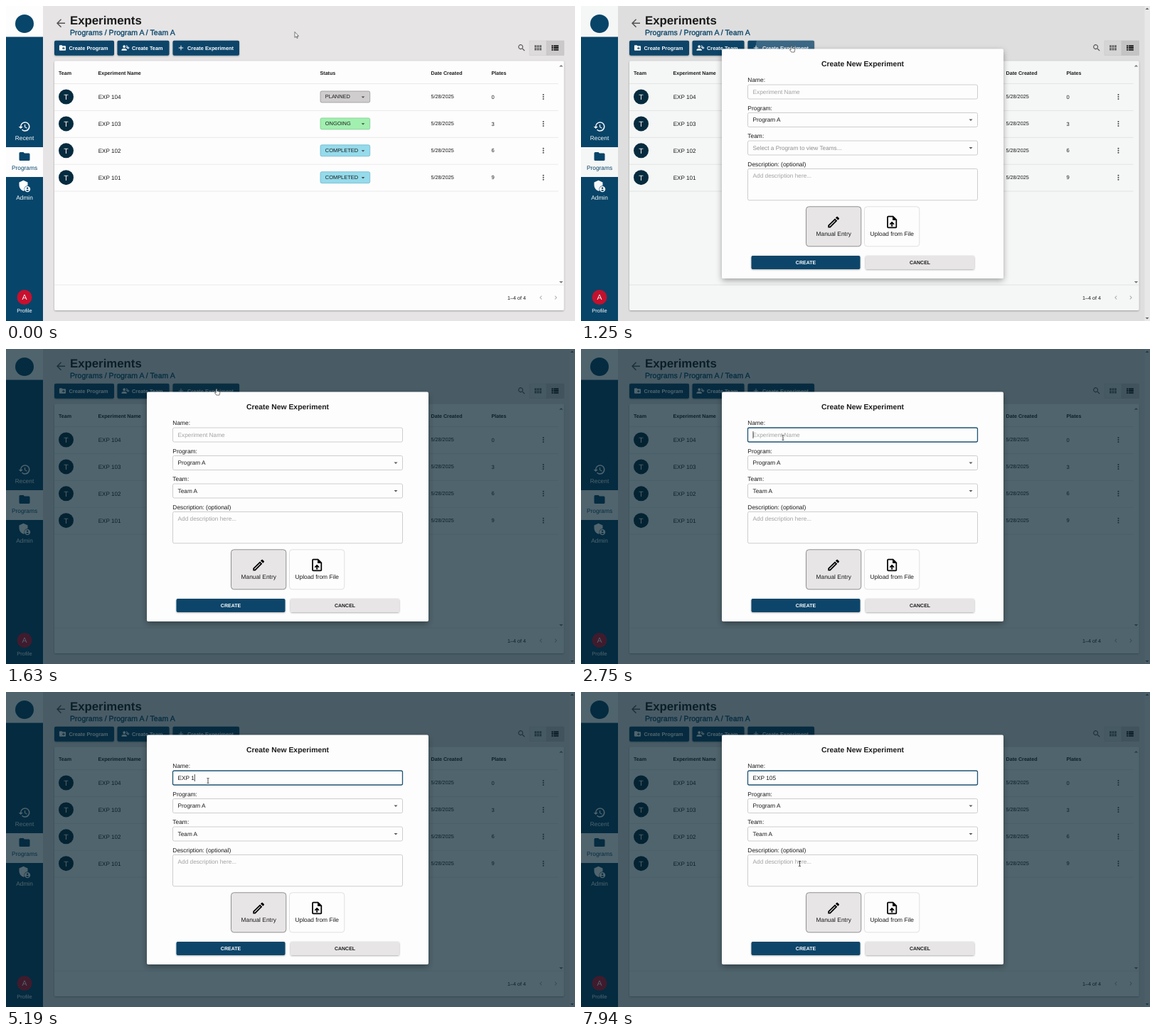
Write an HTML page that moves like this. It is 800 by 444 pixels and loops after 8 s.

```html
<!DOCTYPE html>
<html lang="en">
<head>
<meta charset="utf-8">
<title>Experiments</title>
<style>
html, body { margin: 0; width: 100%; height: 100%; overflow: hidden; background: #e6e4e5; }
svg { display: block; width: 100vw; height: 100vh; }
text { font-family: "Liberation Sans", Arial, sans-serif; text-rendering: geometricPrecision; white-space: pre; }
</style>
</head>
<body>
<svg id="stage" viewBox="0 0 800 444"></svg>
<script>
const NAVY = '#07456a', INK = '#1b1b1b', DEEP = '#052b3f';
const LOOP = 8000;

const icons = {
  back: 'M20 11H7.8l5.6-5.6L12 4l-8 8 8 8 1.4-1.4L7.8 13H20z',
  folder: 'M10 4H4a2 2 0 0 0-2 2v12a2 2 0 0 0 2 2h16a2 2 0 0 0 2-2V8a2 2 0 0 0-2-2h-8z',
  newFolder: 'M10 4H4a2 2 0 0 0-2 2v12a2 2 0 0 0 2 2h16a2 2 0 0 0 2-2V8a2 2 0 0 0-2-2h-8zM14 9h2v3h3v2h-3v3h-2v-3h-3v-2h3z',
  addGroup: 'M8 4a4 4 0 1 0 0 8a4 4 0 0 0 0-8zM0 20v-2c0-5 16-5 16 0v2zM14 4a4 4 0 0 1 0 8q3-4 0-8zM19 8h2v3h3v2h-3v3h-2v-3h-3v-2h3z',
  add: 'M19 13h-6v6h-2v-6H5v-2h6V5h2v6h6z',
  history: 'M13 3a9 9 0 0 0-9 9H1l4 4 4-4H6a7 7 0 1 1 2.1 4.9l-1.4 1.5A9 9 0 1 0 13 3zM12 8v5l4.3 2.5.7-1.2-3.5-2V8z',
  shield: 'M10 1L2 4.5V10c0 5 3.4 9.700 8 11q1-.3 2-.8A6.500 6.500 0 0 1 18 11V4.500zM17.500 12a5.500 5.500 0 1 0 0 11a5.500 5.500 0 0 0 0-11zM17.500 14a1.700 1.700 0 1 1 0 3.400a1.700 1.700 0 0 1 0-3.400zM14.500 20q3-3 6 0q-3 2.500-6 0z',
  search: 'M15.5 14h-.8l-.3-.3A6.500 6.500 0 1 0 13.700 14.400l.3.3v.8l5 5 1.500-1.500zM9.500 14a4.500 4.500 0 1 1 0-9a4.500 4.500 0 0 1 0 9z',
  grid: 'M3 5h5v6H3zM9.500 5h5v6h-5zM16 5h5v6h-5zM3 12.500h5v6H3zM9.500 12.500h5v6h-5zM16 12.500h5v6h-5z',
  list: 'M3 5h4v4H3zM8.500 5H21v4H8.500zM3 10h4v4H3zM8.500 10H21v4H8.500zM3 15h4v4H3zM8.500 15H21v4H8.500z',
  more: 'M12 4a2 2 0 1 0 0 4a2 2 0 0 0 0-4zM12 10a2 2 0 1 0 0 4a2 2 0 0 0 0-4zM12 16a2 2 0 1 0 0 4a2 2 0 0 0 0-4z',
  prev: 'M15.400 7.400L14 6l-6 6 6 6 1.400-1.400L10.800 12z',
  next: 'M8.600 7.400L10 6l6 6-6 6-1.400-1.400L13.200 12z',
  down: 'M7 10l5 5 5-5z',
  up: 'M7 14l5-5 5 5z',
  edit: 'M14.100 9l.9.9L5.900 19H5v-.9zM17.700 3a1 1 0 0 0-.7.3l-1.900 1.800 3.800 3.800 1.800-1.900a1 1 0 0 0 0-1.400l-2.300-2.300a1 1 0 0 0-.7-.3zM14.100 6.200L3 17.250V21h3.750L17.800 9.900z',
  upload: 'M14 2H6a2 2 0 0 0-2 2v16a2 2 0 0 0 2 2h12a2 2 0 0 0 2-2V8zM18 20H6V4h7v5h5zM8 15l1.400 1.400 1.600-1.600V19h2v-4.200l1.600 1.600L16 15l-4-4z'
};

const icon = (name, cx, cy, size, fill = INK) =>
  `<path d="${icons[name]}" fill="${fill}" fill-rule="evenodd" transform="translate(${cx - size / 2} ${cy - size / 2}) scale(${size / 24})"/>`;
const text = (s, x, y, size, fill = INK, extra = '') =>
  `<text x="${x}" y="${y}" font-size="${size}" fill="${fill}" ${extra}>${s}</text>`;
const rect = (x, y, w, h, fill, extra = '') =>
  `<rect x="${x}" y="${y}" width="${w}" height="${h}" fill="${fill}" ${extra}/>`;
const circle = (cx, cy, r, fill) => `<circle cx="${cx}" cy="${cy}" r="${r}" fill="${fill}"/>`;
const BOLD = 'font-weight="700"', MID = 'text-anchor="middle"';
const SOFT = 'rx="2" filter="url(#soft)"';

function sidebar() {
  const item = (name, label, y, color) => icon(name, 26, y, 18, color) + text(label, 26, y + 19.300, 8.350, color, MID);
  return rect(0, 0, 52, 444, NAVY) + rect(0, 0, 52, 43.500, '#fdfdfd') + circle(26, 25, 13, NAVY)
    + item('history', 'Recent', 170, '#fff')
    + rect(0, 199, 52, 42, '#fdfdfd') + item('folder', 'Programs', 212, NAVY)
    + item('shield', 'Admin', 254, '#fff')
    + circle(26, 410.500, 10.500, '#c8102e') + text('A', 26, 414.200, 10.500, '#fff', MID)
    + text('Profile', 26, 432.300, 7.500, '#fff', MID);
}

function header() {
  const button = (x, w, name, label) => rect(x, 48.800, w, 21, NAVY, SOFT)
    + icon(name, x + 11.500, 59, 11, '#fff') + text(label, x + 20.500, 61.600, 7.350, '#fff', BOLD);
  return icon('back', 77, 24.300, 18, '#555') + text('Experiments', 90, 26.300, 16.800, INK, BOLD)
    + text('Programs / Program A / Team A', 90, 40.600, 10.570, NAVY, `stroke="${NAVY}" stroke-width=".3"`)
    + button(68, 84, 'newFolder', 'Create Program')
    + button(156.500, 73, 'addGroup', 'Create Team')
    + button(234.500, 93.500, 'add', 'Create Experiment')
    + '<g clip-path="url(#createClip)"><circle id="ripple" cx="296" cy="59" fill="#fff"/></g>'
    + icon('search', 725, 59, 13, '#555')
    + rect(736, 49, 24.500, 20.500, '#dddbdc', 'stroke="#cfcdce" stroke-width=".6"') + icon('grid', 748, 59, 13, '#666')
    + rect(760, 49, 24.500, 20.500, '#cbc9ca', 'stroke="#c3c1c2" stroke-width=".6"') + icon('list', 772, 59, 13);
}

function table() {
  const line = y => rect(68, y, 708.500, .7, '#e2e2e2');
  const status = {
    PLANNED: ['#cfcdce', '#8d8b8c'], ONGOING: ['#a1f0b0', '#78c889'], COMPLETED: ['#95dbeb', '#62b0c6']
  };
  const row = ([name, state, plates], i) => {
    const y = 128 + 37.900 * i, [fill, edge] = status[state];
    return circle(84.500, y, 10.500, DEEP) + text('T', 84.500, y + 3.800, 10.500, '#fff', MID)
      + text(name, 129.700, y + 3, 8.100)
      + rect(442, y - 8, 69.700, 16, fill, `rx="2" stroke="${edge}" stroke-width=".7"`)
      + text(state, 448.800, y + 2.400, 7.450) + icon('down', 502, y + .3, 11, '#444')
      + text('5/28/2025', 597.400, y + 2.400, 7.300) + text(plates, 682.500, y + 2.600, 7.600)
      + icon('more', 755.500, y, 12, '#444') + line(y + 19);
  };
  const heads = [['Team', 74], ['Experiment Name', 129.500], ['Status', 441.500], ['Date Created', 597.500], ['Plates', 682.500]];
  const rows = [['EXP 104', 'PLANNED', 0], ['EXP 103', 'ONGOING', 3], ['EXP 102', 'COMPLETED', 6], ['EXP 101', 'COMPLETED', 9]];
  return rect(68, 77.500, 716.500, 351.500, '#fdfdfd', SOFT)
    + heads.map(([label, x]) => text(label, x, 97.300, 7.150, INK, BOLD)).join('')
    + line(109) + rows.map(row).join('')
    + rect(68, 392.700, 716.500, .7, '#e2e2e2')
    + icon('up', 780.500, 84.500, 13, '#777') + icon('down', 780.500, 389, 13, '#777')
    + text('1–4 of 4', 705, 413.700, 7.200) + icon('prev', 752, 411, 11, '#aaa') + icon('next', 773, 411, 11, '#aaa');
}

function dialog() {
  const field = (label, y, h, id = '') => text(label, 234.300, y - 3.600, 8.430)
    + rect(234.500, y, 323, h, '#fdfdfd', `${id} rx="2" stroke="#c2c2c2" stroke-width=".8"`);
  const arrow = y => icon('down', 548, y, 12, '#555');
  const choice = (x, name, label, fill, edge) =>
    rect(x, 282.800, 77.300, 56, fill, `rx="4" stroke="${edge}" stroke-width="1"`)
    + icon(name, x + 38.700, 304.500, 21, '#000') + text(label, x + 38.700, 324, 8.380, INK, MID);
  const action = (x, label, fill, color) => rect(x, 352, 153, 19, fill, SOFT)
    + text(label, x + 76.500, 364.200, 7, color, `${BOLD} ${MID}`);
  return rect(198, 60.500, 396, 323.500, '#fdfdfd', 'rx="2" filter="url(#lift)"')
    + text('Create New Experiment', 396, 85.300, 10.400, INK, `${BOLD} ${MID}`)
    + field('Name:', 111, 20, 'id="nameBox"') + text('', 241.600, 123.800, 8.250, INK, 'id="name"')
    + rect(0, 116, .8, 10, '#222', 'id="caret"')
    + field('Program:', 150.500, 20) + text('Program A', 241.600, 163.400, 8.250) + arrow(160.500)
    + field('Team:', 190, 20) + text('', 241.600, 202.900, 8.250, INK, 'id="team"') + arrow(200)
    + field('Description: (optional)', 229.500, 44.300) + text('Add description here...', 241.600, 242.400, 8.250, '#a2a2a2')
    + choice(316.500, 'edit', 'Manual Entry', '#e7e5e6', '#8f8f8f')
    + choice(398.500, 'upload', 'Upload from File', '#fdfdfd', '#e0e0e0')
    + action(239.500, 'CREATE', NAVY, '#fff') + action(400, 'CANCEL', '#e7e5e6', INK);
}

const cursors = `
  <path id="pointer" d="M0 0V8L1.900 6.300 3.100 9 4.300 8.500 3.100 5.900H5.500z" fill="#fff" stroke="#222" stroke-width=".6"/>
  <path id="hand" d="M-.8 .5Q0-.6 .8 .5V3.400L4 4.100Q5 4.400 4.800 5.500L4 9H-.2L-2.600 5.700Q-2.300 4.600-.8 5.700z" fill="#fff" stroke="#222" stroke-width=".6"/>
  <path id="beam" d="M-1.500-3.500H-.4L0-3.100 .4-3.500H1.500M0-3.100V3.100M-1.500 3.500H-.4L0 3.100 .4 3.500H1.500" fill="none" stroke="#222" stroke-width=".8"/>`;

const stage = document.getElementById('stage');
stage.innerHTML = `<defs>
  <filter id="soft" x="-10%" y="-20%" width="120%" height="150%"><feDropShadow dx="0" dy=".8" stdDeviation=".8" flood-opacity=".35"/></filter>
  <filter id="lift" x="-10%" y="-10%" width="120%" height="125%"><feDropShadow dx="0" dy="3" stdDeviation="4" flood-opacity=".35"/></filter>
  <clipPath id="createClip"><rect x="234.500" y="48.800" width="93.500" height="21" rx="2"/></clipPath></defs>`
  + rect(0, 0, 800, 444, '#e6e4e5') + sidebar() + header() + table()
  + `<g id="modal">${rect(792.500, 0, 7.500, 444, '#f0eeef')}${icon('up', 796, 4, 12, '#666')}${icon('down', 796, 440, 12, '#666')}
     ${rect(0, 0, 800, 444, '#04202d', 'id="shade"')}${dialog()}</g>` + cursors;

const el = id => document.getElementById(id);
const show = (id, on) => el(id).setAttribute('display', on ? 'inline' : 'none');
const set = (id, attrs) => { for (const k in attrs) el(id).setAttribute(k, attrs[k]); };
const progress = (t, from, to) => Math.min(1, Math.max(0, (t - from) / (to - from)));
const ease = p => p * p * (3 - 2 * p);

const OPEN = 1190, TEAM_READY = 1480, FOCUS = 2600;
const typed = 'EXP 105', keyTimes = [4300, 4480, 4660, 4840, 5000, 5600, 5950];
const path = [[0, 406, 36.500], [150, 406, 36.500], [850, 296, 56], [1700, 296, 56], [2350, 284, 125],
  [6150, 284, 125], [6600, 286, 124.500], [6950, 286, 124.500], [7850, 307.500, 242]];

function cursorAt(t) {
  const i = path.findIndex(([time]) => time > t);
  if (i < 0) return path[path.length - 1].slice(1);
  const [t0, x0, y0] = path[i - 1], [t1, x1, y1] = path[i], p = ease(progress(t, t0, t1));
  return [x0 + (x1 - x0) * p, y0 + (y1 - y0) * p];
}

function render(t) {
  show('modal', t >= OPEN);
  set('shade', { opacity: .69 * ease(progress(t, 1210, 1520)) });
  set('ripple', { r: 75 * progress(t, 1090, 1330), opacity: .2 * (1 - progress(t, 1450, 1650)) });

  const count = keyTimes.filter(k => k <= t).length;
  set('name', { fill: count ? INK : '#a2a2a2' });
  el('name').textContent = count ? typed.slice(0, count) : 'Experiment Name';
  const teamReady = t >= TEAM_READY;
  set('team', { fill: teamReady ? INK : '#8e8e8e' });
  el('team').textContent = teamReady ? 'Team A' : 'Select a Program to view Teams...';

  const focused = t >= FOCUS;
  set('nameBox', focused ? { stroke: '#1f5575', 'stroke-width': 1.300 } : { stroke: '#c2c2c2', 'stroke-width': .8 });
  const lastKey = count ? keyTimes[count - 1] : FOCUS;
  show('caret', focused && (t - lastKey) % 1060 < 530);
  set('caret', { x: 241.600 + (count ? el('name').getComputedTextLength() : 0) });

  const [x, y] = cursorAt(t);
  const overText = t > OPEN && ((y > 111 && y < 131) || y > 229.500);
  const overButton = y > 49 && y < 70 && x < 328 && t < 1800;
  const shape = overText ? 'beam' : overButton ? 'hand' : 'pointer';
  for (const id of ['pointer', 'hand', 'beam']) show(id, id === shape);
  set(shape, { transform: `translate(${x} ${y})` });
}

function tick() {
  render(performance.now() % LOOP);
  requestAnimationFrame(tick);
}
tick();
</script>
</body>
</html>
```
